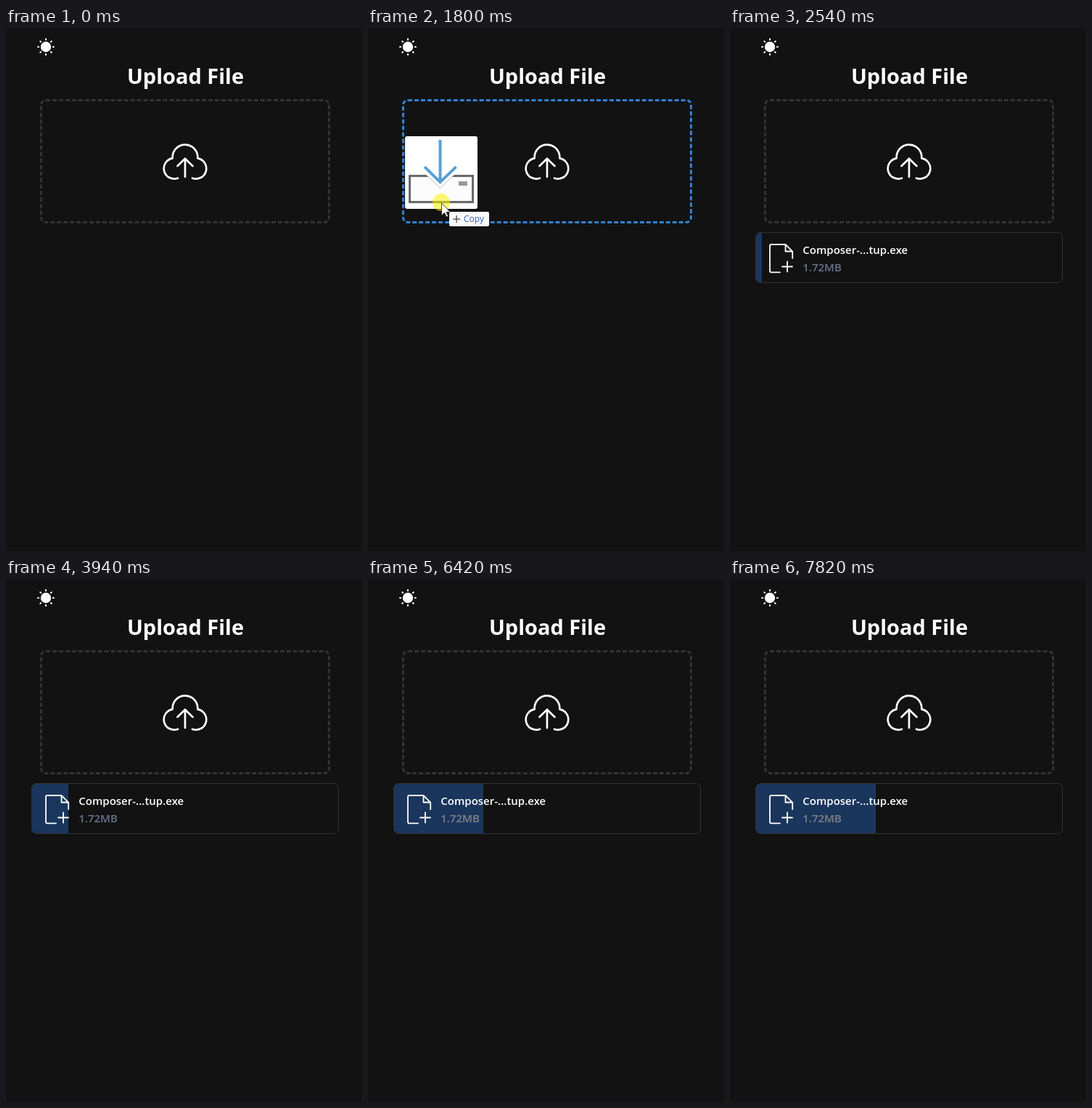
These frames come from a looping animation (491x720 px, 8 s). An HTML page:

```html
<!DOCTYPE html>
<html lang="en">
<head>
<meta charset="utf-8">
<title>Upload File</title>
<style>
  html, body { margin: 0; width: 100%; height: 100%; overflow: hidden; background: #121212; }
  #zone { position: absolute; left: 47px; top: 98px; width: 400px; height: 171px; box-sizing: border-box;
    border: 3px dashed #333; border-radius: 8px; }
  svg { position: absolute; left: 0; top: 0; }
  text { font: 600 15px "Open Sans", "Noto Sans", sans-serif; }
  .line { fill: none; stroke: #fff; stroke-linecap: round; stroke-linejoin: round; }
</style>
</head>
<body>
<div id="zone"></div>
<svg width="491" height="720" viewBox="0 0 491 720">
  <defs>
    <clipPath id="inner"><rect x="36" y="282" width="422" height="68" rx="6"/></clipPath>
    <clipPath id="done"><rect class="bar" x="36" y="282" height="68"/></clipPath>
    <path id="arrow" d="M0 0V17L4 13.2L6.6 19L9 18L6.5 12.3H12Z" fill="#fff" stroke="#222" stroke-width=".8"/>
  </defs>

  <circle cx="55" cy="26" r="7.2" fill="#fff"/>
  <g id="rays" class="line" stroke-width="2"></g>
  <text x="247.5" y="77" text-anchor="middle" fill="#fff" style="font-size:29px;font-weight:700">Upload File</text>

  <g class="line" stroke-width="2.7">
    <path d="M237 206.7A14.25 14.25 0 1 1 229.7 179.3A17.35 17.35 0 1 1 264.3 179.3A14.25 14.25 0 1 1 257 206.7"/>
    <path d="M247 205V180M236.5 190L247 179.8L257.5 190"/>
  </g>

  <g id="card">
    <g clip-path="url(#inner)"><rect class="bar" x="36" y="282" height="68" fill="#1a365d"/></g>
    <rect x="35.5" y="281.5" width="423" height="69" rx="6.5" fill="none" stroke="#333"/>
    <path class="line" stroke-width="1.8" d="M69 336.3H57a2 2 0 0 1-2-2V300a2 2 0 0 1 2-2H76.5L86.2 307.7V317M76.5 298.5V307.5H86M79 321.5V335.5M72 328.5H86"/>
    <text x="100.3" y="311" fill="#fff">Composer-...tup.exe</text>
    <text x="100.3" y="335" fill="#68738c">1.72MB</text>
    <text x="100.3" y="335" fill="#75787c" clip-path="url(#done)">1.72MB</text>
  </g>

  <!-- dragged item, with the pointer tip at 0,0 -->
  <g id="drag">
    <g id="ghost">
      <rect x="-50" y="-91" width="100" height="100" rx="3" fill="#fff"/>
      <rect x="-43.5" y="-36.5" width="87" height="36" fill="#fcfcfc" stroke="#666" stroke-width="3"/>
      <rect x="24" y="-29" width="12" height="6" fill="#999"/>
      <path d="M-22 -39L-1.5 -19.5L19 -39Z" fill="#fff"/>
      <path d="M-18 -36L-1.5 -19.5L15 -36" fill="none" stroke="#bbb"/>
      <path d="M-1.5 -86V-28M-23 -49L-1.5 -28L20.5 -49" fill="none" stroke="#5a9fd4" stroke-width="4"/>
    </g>
    <circle id="ember" r="7" fill="#e8901c"/>
    <ellipse id="glow" cx="1" cy="0" rx="4.5" ry="4.5" fill="#fff0b0"/>
    <circle r="12" fill="#f8ee00" opacity=".55"/>
    <g id="label">
      <use href="#arrow" x=".5" y="1"/>
      <rect x="11" y="13" width="55" height="20" rx="2" fill="#fafafa"/>
      <path d="M16 23H26M21 18V28" stroke="#444" stroke-width="1.3"/>
      <text x="31" y="27" fill="#2f66c0" style="font-size:12px;font-weight:400">Copy</text>
    </g>
  </g>
  <use id="pointer" href="#arrow" transform="translate(352 692) scale(.83)"/>
</svg>
<script>
const $ = id => document.getElementById(id);
const show = (id, on) => $(id).style.display = on ? '' : 'none';
const bars = document.querySelectorAll('.bar');

for (let i = 0; i < 8; i++)
  $('rays').innerHTML += `<path d="M9.8 0H11" transform="translate(55 26) rotate(${i * 45})"/>`;

// bursts of progress: first step, last step, number of steps, right edge reached
const bursts = [
  [2540, 2870, 4, 55], [3080, 3400, 4, 70], [3600, 3670, 2, 78], [3820, 3940, 2, 86],
  [4090, 4160, 2, 93], [4360, 4690, 4, 109], [4890, 5350, 5, 128], [5550, 6010, 5, 147],
  [6230, 6620, 5, 166], [6890, 7290, 5, 185], [7490, 7820, 4, 201]
];

function edgeAt(t) {
  let edge = 40;
  for (const [start, end, steps, to] of bursts) {
    if (t < start) break;
    const n = Math.min(steps, Math.floor((t - start) / (end - start) * (steps - 1) + 1.1));
    edge += (to - edge) * n / steps;
  }
  return Math.ceil(edge);
}

const easeOut = p => 1 - (1 - p) ** 2;

function draw(t) {
  show('pointer', t >= 130 && t < 210);

  const dragging = t >= 1660 && t < 2200;
  show('drag', dragging);
  const step = Math.min(5, Math.floor((t - 1660) / 68 + .01));
  const p = easeOut(Math.max(0, step) / 5);
  const x = -2 + 161 * p, y = 252 - 29 * p * p;
  if (dragging) $('drag').setAttribute('transform', `translate(${x} ${y})`);
  for (const id of ['ghost', 'label']) show(id, step > 0);
  for (const id of ['ember', 'glow']) show(id, step < 1);
  $('zone').style.borderColor = dragging && x > 47 ? '#3182ce' : '#333';

  show('card', t >= 2200);
  const enter = easeOut(Math.min(1, Math.max(0, (Math.floor((t - 2200) / 68 + .01) + 1) / 6)));
  $('card').setAttribute('transform', `translate(0 ${27 * (1 - enter)})`);
  $('card').setAttribute('opacity', enter);
  bars.forEach(bar => bar.setAttribute('width', edgeAt(t) - 36));
}

const begin = performance.now();
function tick() {
  draw((performance.now() - begin) % 8000);
  requestAnimationFrame(tick);
}
tick();
</script>
</body>
</html>
```
